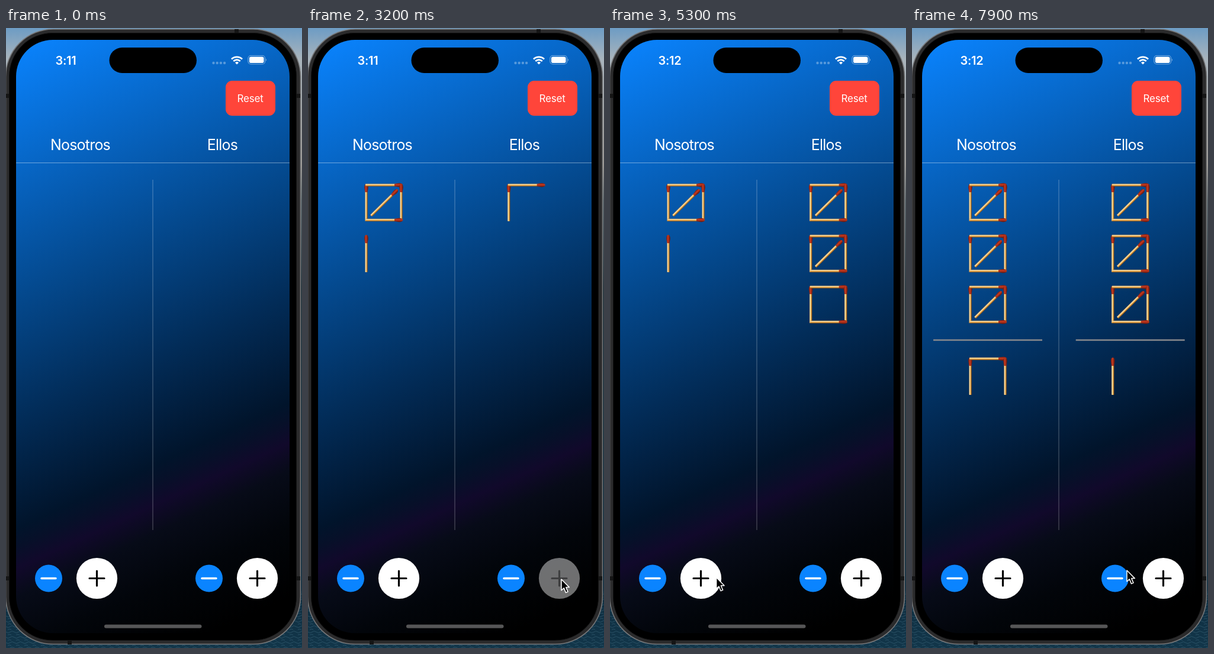
An HTML page for the animation above (8 s loop, 500 by 1046 pixels).

```html
<!DOCTYPE html>
<html lang="es">
<head>
<meta charset="utf-8">
<title>Score keeper</title>
<style>
  html, body { margin: 0; width: 100%; height: 100%; overflow: hidden; background: #000; }
  svg { display: block; width: 500px; height: 1046px; }
  text { font-family: Inter, Roboto, sans-serif; fill: #fff; text-anchor: middle; }
  .title { font-size: 25px; letter-spacing: -.8px; }
  .label { font-size: 17px; letter-spacing: -.2px; }
  .clock { font-size: 20px; font-weight: 600; letter-spacing: -.2px; }
</style>
</head>
<body>
<svg viewBox="0 0 500 1046" xmlns="http://www.w3.org/2000/svg">
  <defs>
    <linearGradient id="sky" x2="0" y2="1">
      <stop offset="0" stop-color="#6d9cc4"/>
      <stop offset=".05" stop-color="#a9b4bc"/>
      <stop offset=".22" stop-color="#a3a09c"/>
      <stop offset=".28" stop-color="#5b666c"/>
      <stop offset=".42" stop-color="#23323b"/>
      <stop offset=".9" stop-color="#0e2c3e"/>
      <stop offset="1" stop-color="#12364a"/>
    </linearGradient>
    <pattern id="waves" width="14" height="9" patternUnits="userSpaceOnUse">
      <path d="M0 2q4 3 7 0t7 0M3 7q3 -2 6 0" fill="none" stroke="#3f6a80" stroke-opacity=".5"/>
    </pattern>
    <linearGradient id="screen" gradientUnits="userSpaceOnUse" x1="17" y1="20" x2="479" y2="1021">
      <stop offset="0" stop-color="#0a84ff"/>
      <stop offset=".35" stop-color="#044a90"/>
      <stop offset=".53" stop-color="#022c58"/>
      <stop offset=".68" stop-color="#01142b"/>
      <stop offset=".705" stop-color="#071029"/>
      <stop offset=".735" stop-color="#11092b"/>
      <stop offset=".775" stop-color="#070b18"/>
      <stop offset=".85" stop-color="#02050a"/>
      <stop offset=".95" stop-color="#000"/>
    </linearGradient>
    <linearGradient id="wood">
      <stop offset="0" stop-color="#b98d52"/>
      <stop offset=".3" stop-color="#fbe6b4"/>
      <stop offset=".6" stop-color="#e9a747"/>
      <stop offset="1" stop-color="#7c4a18"/>
    </linearGradient>
    <linearGradient id="tip">
      <stop offset="0" stop-color="#7d1a0c"/>
      <stop offset=".4" stop-color="#c63c22"/>
      <stop offset="1" stop-color="#64130a"/>
    </linearGradient>
    <g id="match">
      <rect x="-2.2" y="9" width="4.4" height="54" rx=".8" fill="url(#wood)"/>
      <path d="M0 0C2.6 0 3.4 3.5 3.2 6.5C3 9.5 2.2 11.5 2 14H-2C-2.2 11.5 -3 9.5 -3.2 6.5C-3.4 3.5 -2.6 0 0 0Z" fill="url(#tip)"/>
    </g>
  </defs>

  <rect width="500" height="1046" fill="url(#sky)"/>
  <rect y="950" width="500" height="96" fill="url(#waves)"/>

  <!-- phone body -->
  <rect x="-.5" y="2" width="498" height="1037.5" rx="80" fill="#2b2b2c" stroke="#77787a" stroke-width="1.6"/>
  <path d="M386 5h7M104 1037h7M2 111v7M2 925v7M494 111v7M494 925v7" stroke="#151515" stroke-width="6"/>
  <rect x="5.5" y="8.5" width="485" height="1024.5" rx="73" stroke="#111"/>
  <rect x="17" y="20" width="462" height="1001" rx="62" fill="url(#screen)"/>
  <rect x="174.500" y="33" width="147.500" height="43" rx="21.500"/>

  <!-- status bar -->
  <text id="clock" class="clock" x="101" y="61.500">3:11</text>
  <g fill="#fff" fill-opacity=".32">
    <circle cx="350.500" cy="59" r="2.200"/><circle cx="356.700" cy="59" r="2.200"/>
    <circle cx="362.900" cy="59" r="2.200"/><circle cx="369.100" cy="59" r="2.200"/>
  </g>
  <g fill="none" stroke="#fff" stroke-width="2.800">
    <path d="M381 52.500a13 13 0 0 1 18 0M384.300 56a8.200 8.200 0 0 1 11.400 0"/>
    <path d="M390 61.500l-3 -3.100a4.400 4.400 0 0 1 6 0z" fill="#fff" stroke="none"/>
  </g>
  <rect x="409" y="46.500" width="28.500" height="14.500" rx="4.500" fill="none" stroke="#fff" stroke-opacity=".45" stroke-width="1.200"/>
  <rect x="411" y="48.500" width="24.500" height="10.500" rx="2.800" fill="#fff"/>
  <path d="M439 51.500q2 2.250 0 4.500z" fill="#fff" fill-opacity=".5"/>

  <rect x="371" y="89" width="84" height="59" rx="11" fill="#ff453a"/>
  <text class="label" x="412.500" y="125">Reset</text>
  <text class="title" x="125.500" y="206">Nosotros</text>
  <text class="title" x="365.500" y="206">Ellos</text>
  <path d="M17 227.500H479" stroke="#fff" stroke-opacity=".42"/>
  <path d="M248 256V847" stroke="#fff" stroke-opacity=".27" stroke-width="1.200"/>

  <g id="board"></g>
  <rect x="166" y="1006.500" width="164.500" height="6" rx="3" fill="#565657"/>
  <path id="cursor" d="M0 0V18.800L4.300 14.900L7.500 22.600L11 21.100L7.800 13.600H13.400Z" fill="#000" stroke="#fff" stroke-width="1.500" stroke-linejoin="round"/>
</svg>

<script>
const LOOP = 8000, STEP = 100;
const board = document.getElementById('board');
const clock = document.getElementById('clock');
const cursor = document.getElementById('cursor');

function add(tag, attrs) {
  const el = document.createElementNS('http://www.w3.org/2000/svg', tag);
  for (const key in attrs) el.setAttribute(key, attrs[key]);
  return board.appendChild(el);
}

// x, y and turn of each match's head within a row, in order of scoring
const POSES = [[98.5, 263, 0], [160, 265, 90], [157.5, 263, 0], [160, 324, 90], [151.5, 272.5, 45.5]];
const ROWS = [0, 86, 172, 293];

function makeSide(shift, press, clicks) {
  const matches = ROWS.flatMap(dy => POSES.map(([x, y, turn]) =>
    add('use', { href: '#match', transform: `translate(${x + shift} ${y + dy}) rotate(${turn})` })));
  const divider = add('path', { d: `M${36 + shift} 526.5h184`, stroke: '#87888c', 'stroke-width': 2.6 });

  add('circle', { cx: 72 + press, cy: 928.5, r: 23, fill: '#0a84ff' });
  add('path', { d: `M${60 + press} 928.5h24`, stroke: '#fff', 'stroke-width': 3.4, 'stroke-linecap': 'round' });
  const plus = [
    add('circle', { cx: 153.5 + press, cy: 928.5, r: 34.6, fill: '#fff' }),
    add('path', { d: `M${141 + press} 928.5h25m-12.5 -12.5v25`, stroke: '#000', 'stroke-width': 3.2, 'stroke-linecap': 'round' })
  ];

  return t => {
    const done = clicks.filter(c => c <= t);
    const since = done.length ? t - done[done.length - 1] : LOOP;
    const fade = Math.min(1, .35 + since * .0026);
    matches.forEach((m, i) => m.setAttribute('visibility', i < done.length ? 'visible' : 'hidden'));
    divider.setAttribute('visibility', done.length > 15 ? 'visible' : 'hidden');
    plus.forEach(p => p.setAttribute('opacity', fade));
  };
}

const run = (start, gap, count) => Array.from({ length: count }, (_, i) => start + i * gap);
const sides = [
  makeSide(0, 0, [...run(890, 403, 4), 2400, 2650, ...run(5420, 135, 12)]),
  makeSide(240.7, 271, [...run(3035, 133, 14), 7120, 7260])
];

// time, x, y
const PATH = [
  [200, 330, 1046], [700, 168, 934], [2700, 168, 934], [3000, 428, 930], [4850, 428, 930],
  [5350, 172.5, 927], [6920, 172.5, 927], [7100, 428, 930], [7400, 428, 930], [7900, 363, 915]
];

function placeCursor(t) {
  cursor.setAttribute('visibility', t < PATH[0][0] ? 'hidden' : 'visible');
  const next = PATH.findIndex(p => p[0] > t);
  const b = next < 0 ? PATH[PATH.length - 1] : PATH[next];
  const a = next > 0 ? PATH[next - 1] : b;
  const k = a === b ? 1 : (t - a[0]) / (b[0] - a[0]);
  const e = k * k * (3 - 2 * k);
  cursor.setAttribute('transform', `translate(${a[1] + (b[1] - a[1]) * e} ${a[2] + (b[2] - a[2]) * e})`);
}

function draw(now) {
  const t = Math.floor((now % LOOP) / STEP) * STEP;
  sides.forEach(show => show(t));
  placeCursor(t);
  clock.textContent = t < 5000 ? '3:11' : '3:12';
}

const start = performance.now();
function tick() {
  draw(performance.now() - start);
  requestAnimationFrame(tick);
}
tick();
</script>
</body>
</html>
```
